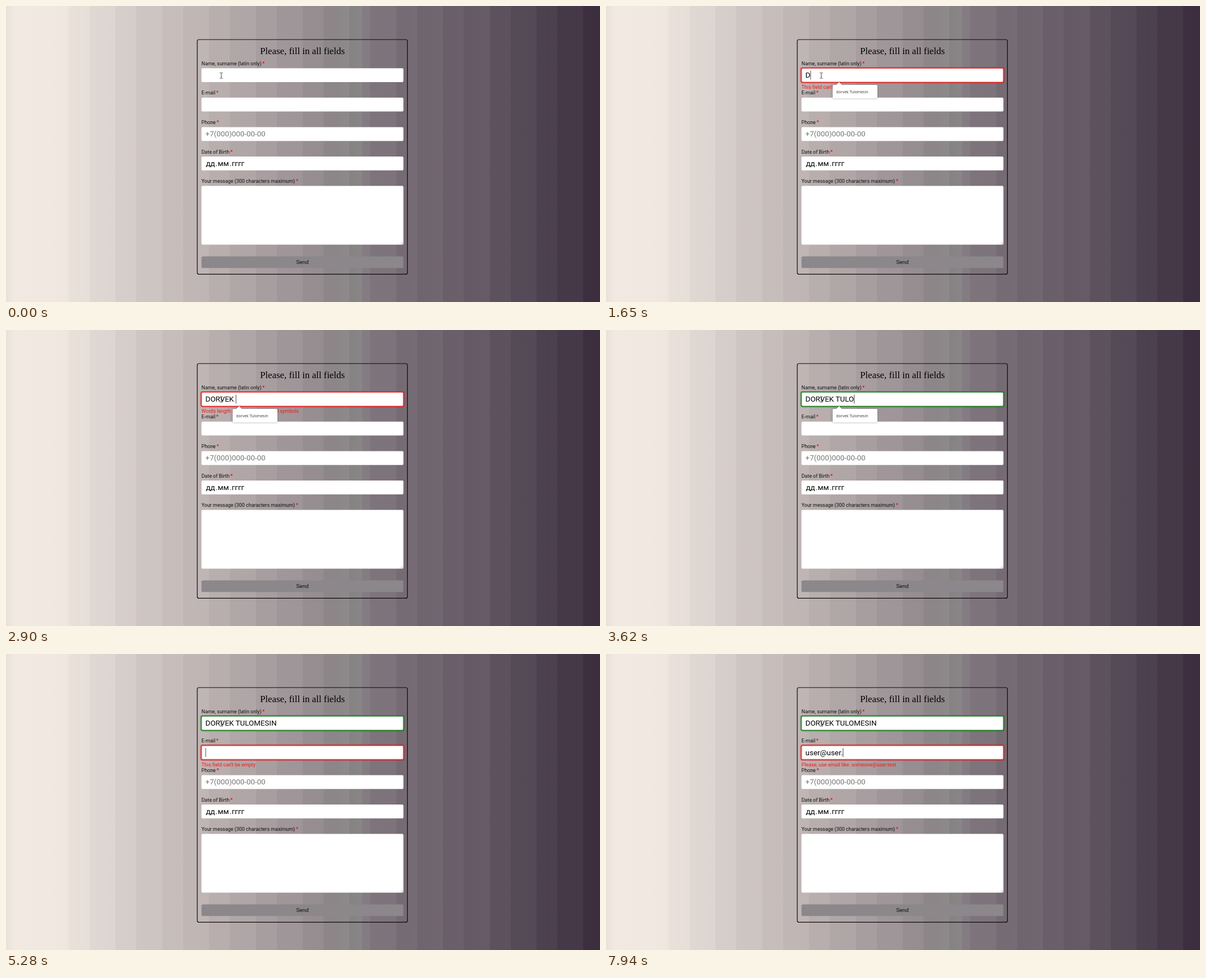
Animation of 1059x529 px, one loop 8000 ms. Source, as an HTML page:

```html
<!DOCTYPE html>
<html lang="en">
<head>
<meta charset="utf-8">
<title>Form</title>
<style>
html, body { margin: 0; width: 100%; height: 100%; overflow: hidden; }
body {
  background:
    repeating-linear-gradient(90deg, #00000006, #ffffff08 37px, #00000006 37px, #ffffff0a 83.4px) right / 947px 100% no-repeat,
    linear-gradient(90deg, #eae1db, #f2e9e3 16px, #f0e7e0 105px, #d2c9c7 240px, #b9afae 380px, #9d9397 520px,
      #8b8587 590px, #878585 634px, #837a81 636px, #756a73 713px, #625662 850px, #4b3f4e 960px, #38293a);
}
svg { display: block; font-family: Roboto, sans-serif; font-size: 8.95px; font-variant-ligatures: none; }
text { white-space: pre; fill: #111; }
.big { font-size: 13.4px; fill: #000; }
.error { fill: #ee1c1c; }
.star { fill: #f00; font-weight: 700; }
.glow { fill: none; stroke: currentColor; stroke-width: 1.2; filter: drop-shadow(0 0 1.2px currentColor); }
#popup { filter: drop-shadow(0 .5px 1px #0007); }
#popup text { font: 6.9px "Open Sans", sans-serif; fill: #333; }
</style>
</head>
<body>
<svg width="1059" height="529" viewBox="0 0 1059 529">
  <rect x="341" y="60" width="374.6" height="419.4" rx="3" fill="none" stroke="#0a080a" stroke-width="1.2"/>
  <text x="528.5" y="86.3" text-anchor="middle" style="font: 16.83px 'Liberation Serif', serif; fill: #000">Please, fill in all fields</text>
  <g id="fields"></g>
  <path d="M703.5 425.5l4-4M706 425.5l1.5-1.5" stroke="#777" stroke-width=".6"/>
  <text class="big" x="355.6" y="233.4" style="fill: #757575">+7(000)000-00-00</text>
  <text class="big" y="286.4"><tspan x="356.4">дд</tspan><tspan x="373.6">.</tspan><tspan x="377.6">мм</tspan><tspan x="398.4">.</tspan><tspan x="402.4">гггг</tspan></text>
  <rect x="348.5" y="447.4" width="360" height="20.8" rx="2.5" fill="#8b878a"/>
  <text x="528.5" y="461.2" text-anchor="middle" style="font-size: 9.8px">Send</text>
  <g id="inputs"></g>
  <rect id="caret" width=".9" height="16" fill="#333"/>
  <g id="popup" fill="#fff">
    <path d="M410 141.5l5.5-5.5 5.5 5.5z"/>
    <rect id="list" x="404" y="141" rx="1.5"/>
    <g id="rows"></g>
  </g>
  <path d="M381.2 119.4h1.6l1 .7 1-.7h1.6M383.8 120v8.6M381.2 129.2h1.6l1-.7 1 .7h1.6" fill="none" stroke="#333" stroke-width=".9"/>
</svg>
<script>
const $ = id => document.getElementById(id);
const LOOP = 8000, NAME_FOCUS = 590, MAIL_FOCUS = 5100, HINTS_OPEN = 790, BLINK = 555;
const TOP = 111.2, PITCH = 52.6, TEXT_X = 355.6, ROW = 17.7;
const RED = '#e3191b', GREEN = '#167a1a';
const HINTS = ['dorvek Tulomesin', 'Dorvek', 'dorvek tulomesin', 'qwerty', 'some sample text for the name'];

const labels = ['Name, surname (latin only)', 'E-mail', 'Phone', 'Date of Birth', 'Your message (300 characters maximum)'];
$('fields').innerHTML = labels.map((label, i) => {
  const y = TOP + i * PITCH, height = i == 4 ? 105 : 24.8;
  return `<text x="348.5" y="${y - 5.4}">${label}<tspan class="star" dx="1.7">*</tspan></text>
    <rect x="348.5" y="${y}" width="360" height="${height}" rx="2" fill="#fff"/>`;
}).join('');

const inputs = [0, 1].map(i => {
  const group = document.createElementNS('http://www.w3.org/2000/svg', 'g'), y = TOP + i * PITCH;
  group.innerHTML = `<rect class="glow" x="347.9" y="${y - .6}" width="361.2" height="26" rx="2.5"/>
    <text class="big" x="${TEXT_X}" y="${y + 17.1}"></text><text class="error" x="348.5" y="${y + 36.7}"></text>`;
  $('inputs').append(group);
  const [glow, value, error] = group.children;
  return { glow, value, error };
});

// Each burst of typing spreads its letters evenly from first to last keystroke.
const burst = (text, first, last) =>
  [...text].map((letter, i) => ({ letter, time: first + (last - first) * i / (text.length - 1) }));
const nameKeys = [...burst('DORVEK', 1650, 2500), ...burst(' TULOMESIN', 2900, 4330)];
const mailKeys = [...burst('user', 5970, 6360), ...burst('@user.', 7110, 7940)];
const activity = [NAME_FOCUS, MAIL_FOCUS, ...[...nameKeys, ...mailKeys].map(key => key.time)];

const typed = (keys, time) => keys.filter(key => key.time <= time + .01).map(key => key.letter).join('');

function nameError(text) {
  if (!text) return '';
  const words = text.split(' ');
  if (text.length < 2) return "This field can't be empty";
  if (words.some(word => word.length < 3)) return 'Words length must be from 3 to 30 symbols';
  return words.length < 2 ? 'Please, enter name and surname' : '';
}
const mailError = text => text ? 'Please, use email like: someone@user.test' : "This field can't be empty";

function showInput({ glow, value, error }, text, message, opacity) {
  glow.style.color = message ? RED : GREEN;
  glow.style.opacity = opacity;
  value.textContent = text;
  error.textContent = message;
}

function showPopup(count) {
  $('popup').style.display = count ? '' : 'none';
  $('list').setAttribute('width', count > 1 ? 113 : 80);
  $('list').setAttribute('height', 24.5 + Math.max(0, count - 1) * ROW);
  $('rows').innerHTML = HINTS.slice(0, count).map((hint, i) =>
    `<text x="410.3" y="${156 + i * ROW}">${hint}</text>`).join('');
}

function showCaret(time, active) {
  const { value } = inputs[active];
  const idle = time - Math.max(...activity.filter(moment => moment <= time + .01));
  $('caret').style.opacity = idle % (2 * BLINK) < BLINK ? 1 : 0;
  $('caret').setAttribute('x', TEXT_X + (value.textContent ? value.getComputedTextLength() : 0));
  $('caret').setAttribute('y', 115.5 + active * PITCH);
}

function draw(time) {
  const name = typed(nameKeys, time), mail = typed(mailKeys, time), onMail = time >= MAIL_FOCUS;
  const fade = Math.min(1, Math.max(0, (time - MAIL_FOCUS) / 180));
  showInput(inputs[0], name, nameError(name), name ? 1 : 0);
  showInput(inputs[1], mail, onMail ? mailError(mail) : '', fade);
  showPopup(time < HINTS_OPEN || onMail ? 0 : name ? 1 : HINTS.length);
  showCaret(time, onMail ? 1 : 0);
}

const begin = performance.now();
function tick() {
  draw((performance.now() - begin) % LOOP);
  requestAnimationFrame(tick);
}
tick();
</script>
</body>
</html>
```
